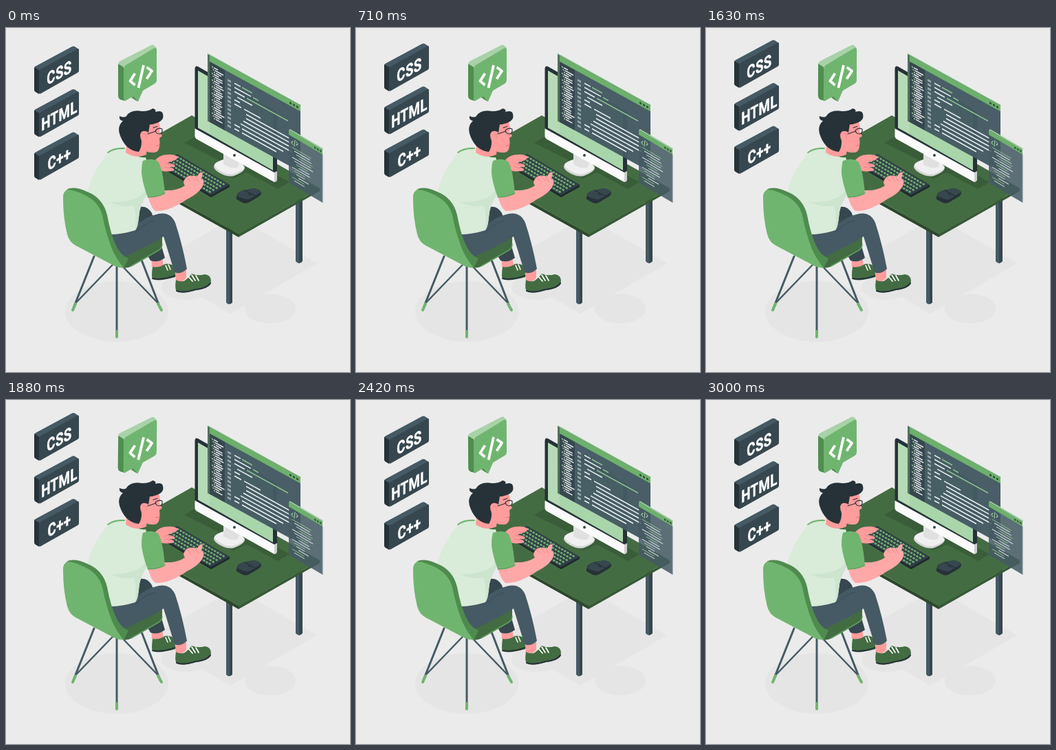
An HTML page for the animation above (3040 ms loop, 500 px wide and 500 px high).

```html
<!DOCTYPE html>
<html lang="en">
<head>
<meta charset="utf-8">
<title>Developer at a desk</title>
<style>
html, body { margin: 0; width: 100%; height: 100%; overflow: hidden; background: #ebebeb; }
svg { display: block; width: 100vw; height: 100vh; }
.line { fill: none; stroke-linecap: round; stroke-linejoin: round; }
.label { font: bold 25px Roboto, Arial, sans-serif; letter-spacing: .5px; fill: #fff; text-anchor: middle; stroke: #fff; stroke-width: .5; stroke-linejoin: round; }
</style>
</head>
<body>
<svg viewBox="0 0 500 500">
  <!-- floor -->
  <g fill="#e5e5e5">
    <ellipse cx="161" cy="412" rx="75" ry="44"/>
    <ellipse cx="384" cy="408" rx="37" ry="21.500"/>
    <path d="M208 346L326 415L452 342L334 274Z"/>
    <ellipse cx="262" cy="377" rx="36" ry="18"/>
  </g>

  <!-- desk -->
  <g fill="#455a64">
    <path d="M421 245H431V339Q426 345 421 339Z"/>
    <path d="M320 288H329V399Q324 404 320 399Z"/>
  </g>
  <path d="M426 245H431V339L426 342ZM325 288H329V399L325 401Z" fill="#37474f"/>
  <path d="M152 195L338 299V304L152 200Z" fill="#2c482c"/>
  <path d="M338 299L456 233V237L338 304Z" fill="#365a36"/>
  <path d="M270 127L456 233L338 299.500L152 194Z" fill="#446c42"/>
  <path d="M259 167L283 153L412 224L395 234L350 210L330 219L306 208L315 195Z" fill="#3a5d39"/>

  <!-- monitor -->
  <path d="M316 184L340 196L347 203Q347 209 331 215Q322 217 311 211Q299 204 303 199Q306 195 316 192Z" fill="#d6d6d6"/>
  <path d="M316 182L340 194L347 202Q346 207 331 212Q322 214 312 208Q300 201 304 197Q307 194 316 191Z" fill="#f0f0f0"/>
  <path d="M316 182L340 194L337 202Q328 206 316 198Z" fill="#e0e0e0"/>
  <path d="M274.500 60Q274.500 54 279 56L391 120Q394 122 394 126V215L274.500 149Z" fill="#263238"/>
  <path d="M279 62L388 124V207L279 145Z" fill="#a9d5aa"/>
  <path d="M279 62L296 72V154L279 145Z" fill="#b5dab5"/>
  <path d="M274.500 146L390 210V224L278 162Q274.500 160 274.500 157Z" fill="#fafafa"/>
  <path d="M390 210L394 208V221Q393 224 390 224Z" fill="#d0d0d0"/>
  <circle cx="332" cy="185" r="2" fill="#37474f"/>

  <!-- floating windows -->
  <path d="M292 38L294 37L429 112L428 113Z" fill="#a4d0a4"/>
  <g id="editor" transform="matrix(1 .55 0 1 293 38)">
    <path d="M0 0H135V97H0Z" fill="#455a64" opacity=".97"/>
    <path d="M0 9H25V97H0Z" fill="#37474f"/>
    <path d="M0 0H135V9H0Z" fill="#6db06c"/>
    <path d="M0 0H3V97H0Z" fill="#53715f"/>
    <path d="M119 3.500h3v3h-3zM124 3.500h3v3h-3zM129 3.500h3v3h-3z" fill="#35543a"/>
  </g>
  <path d="M411 148L413 147L461 175L460 177Z" fill="#a4d0a4"/>
  <g id="panel" transform="matrix(1 .585 0 1 411 148)">
    <path d="M0 0H49V77H0Z" fill="#455a64" opacity=".86"/>
    <path d="M0 0H49V7H0Z" fill="#6db06c"/>
    <path d="M48 7H49.500V77H48Z" fill="#6f828b"/>
    <path d="M37 2.500h2.500v2.500h-2.500zM41 2.500h2.500v2.500h-2.500zM45 2.500h2.500v2.500h-2.500z" fill="#35543a"/>
    <path class="line" d="M6 13l-2 3 2 2M11 11l2 2-2 3M9 10l-1 9" stroke="#a9d5aa"/>
  </g>

  <!-- keyboard and mouse -->
  <path d="M221 200L249 184L325 228V231L298 246Z" fill="#1e282d"/>
  <path d="M221 198L249 183L325 228L298 243Z" fill="#303f46"/>
  <g id="keys" class="line" stroke="#70ad70" stroke-width="2.600" stroke-dasharray="3.400 1.400" style="stroke-linecap:butt"></g>
  <path d="M335 246Q336 238 345 236L360 233Q371 235 371 240Q371 243 366 246L354 253Q350 256 344 254L337 250Q334 249 335 246Z" fill="#263238"/>
  <path d="M336 244Q338 238 346 236L360 233Q370 234 370 239Q364 243 353 249Q347 250 336 244Z" fill="#37474f"/>
  <path class="line" d="M347 236L362 244M352 241l4 2" stroke="#1e282d"/>

  <!-- far arm and far leg -->
  <path d="M216 193Q223 184 235 184Q243 183 250 187Q249 191 243 193L234 196Q246 197 246 201Q244 202 237 202Q246 204 244 207Q234 210 224 207L214 208Z" fill="#ff9c9c"/>
  <path class="line" d="M232 197l10 2M230 202l9 2" stroke="#e98686"/>
  <path d="M211 333L227 331L229 347Q219 353 212 346Z" fill="#ff9c9c"/>
  <path d="M213 347Q211 361 213 365Q221 369 246 362L247 348Q240 342 231 343Q222 349 213 347Z" fill="#436c42"/>
  <path class="line" d="M213 364Q226 367 246 360" stroke="#263238" stroke-width="2"/>
  <path class="line" d="M232 345l3 7M236 344l3 7" stroke="#fff" stroke-width="1.500"/>
  <path d="M186 263Q203 254 212 269L231 334Q221 342 210 338L188 300Z" fill="#37474f"/>

  <!-- chair legs and seat -->
  <g class="line" stroke="#455a64" stroke-width="3">
    <path d="M128 332L98 407M195 332L224 407M161 342V445"/>
    <path d="M157 342L102 399M165 342L220 399" stroke-width="2.500"/>
  </g>
  <path class="line" d="M101 401L97 410M221 401L226 410M161 441V449" stroke="#70b56f" stroke-width="4"/>
  <path d="M155 325L227 302V317Q227 321 222 324L183 346Q174 351 165 347Z" fill="#436c42"/>
  <path class="line" d="M227 314Q227 320 222 323L182 346" stroke="#5c9d5b" stroke-width="1.500"/>

  <!-- near leg -->
  <path d="M245 350L262 347L262 363Q255 372 247 367Z" fill="#ff9c9c"/>
  <path d="M247 366Q245 379 248 382Q256 387 276 381Q297 378 298 368Q298 359 289 358Q278 361 270 357Q263 366 258 368Q251 369 247 366Z" fill="#436c42"/>
  <path class="line" d="M248 382Q257 386 276 380Q293 378 297 371" stroke="#263238" stroke-width="2.200"/>
  <path class="line" d="M265 361l6 7M270 359l5 8M276 360l4 7" stroke="#fff" stroke-width="1.700"/>
  <path d="M150 299L188 288Q203 274 222 270Q239 267 246 283Q256 313 263 350Q254 359 245 355L229 303Q212 314 196 321L168 335Z" fill="#455a64"/>
  <path class="line" d="M188 297Q207 280 216 280" stroke="#3a4d56"/>

  <!-- torso and neck -->
  <path d="M152 177Q163 171 177 178Q194 190 203 188Q212 215 204 242Q194 258 193 276Q191 291 188 294Q169 300 151 300L118 239Q126 207 152 177Z" fill="#d9ebd9"/>
  <path d="M205 230Q201 242 190 247Q165 256 150 252Q168 262 186 258Q190 271 188 293Q192 290 193 275Q194 258 205 242Z" fill="#cde4ce"/>
  <path class="line" d="M148 181Q158 174 172 175" stroke="#70b56f" stroke-width="2"/>
  <path d="M175 169L205 174L204 184Q189 191 174 181Z" fill="#ff9c9c"/>

  <!-- head -->
  <path d="M198 140L222 136Q225 145 223 150L227 157L223 160Q224 165 223 172Q222 182 213 181Q204 181 196 175L190 160Z" fill="#ff9c9c"/>
  <path d="M165 128Q172 131 175 128Q181 118 198 121Q208 121 213 117Q219 118 217 122Q227 119 228 125Q231 135 216 139Q211 141 209 140L207 152Q197 148 196 158Q199 171 193 180Q175 178 167 159Q160 144 170 135Q164 134 165 128Z" fill="#263238"/>
  <path d="M206 151Q197 147 195 155Q195 167 205 166Z" fill="#ff9c9c"/>
  <path class="line" d="M199 154Q205 153 204 160" stroke="#e98686"/>
  <path class="line" d="M206 154L218 150M217 149Q222 144 227 147Q228 153 223 154Q218 154 217 149M214 145l6-2" stroke="#263238" stroke-width="1.100"/>
  <path class="line" d="M218 171l5-1" stroke="#d87878"/>

  <!-- near arm -->
  <path d="M206 242L230 236Q249 237 260 229Q255 223 263 216Q270 213 278 216Q281 208 286 210Q285 215 284 220Q289 219 287 227Q283 239 263 249Q237 267 217 266Q209 259 206 242Z" fill="#ffa8a8"/>
  <path class="line" d="M262 217l6 5M269 215l6 7M276 217l4 6" stroke="#e98686"/>
  <path d="M199 193Q212 188 221 194Q228 204 231 241Q221 247 206 246Q199 228 197 211Q197 199 199 193Z" fill="#70b56f"/>
  <path class="line" d="M206 246Q220 246 231 240" stroke="#569b55"/>

  <!-- chair back -->
  <path d="M83 248Q82 237 91 234Q98 231 117 238Q139 247 144 270Q149 302 157 322Q162 334 174 337Q168 343 172 349Q165 349 158 346L101 316Q92 311 89 300Q83 276 83 248Z" fill="#70b56f"/>
  <path d="M88 235Q98 229 118 238Q141 247 147 272Q152 299 160 316Q166 330 178 335L171 349Q160 335 154 321Q145 298 140 272Q135 253 115 243Q97 234 88 235Z" fill="#4f8b4e"/>

  <g id="tags"></g>

  <!-- speech bubble -->
  <g id="bubble">
    <path d="M163 52L171 55L173 106L166 104Q163 102 163 99Z" fill="#4f8e4e"/>
    <path d="M163 52Q163 50 166 48L211 25Q213 24 215 25L219 29L171 57Z" fill="#a8d2a8"/>
    <path d="M171 59Q171 56 174 54L214 30Q219 27 219 32V76Q219 79 216 81L199 91L192 107L185 99L175 105Q171 108 171 103Z" fill="#70b56f"/>
    <path d="M185 99L192 107L188 105L182 101Z" fill="#4f8e4e"/>
    <path class="line" d="M187.500 66L180.500 77L187.500 83M200 54L192.500 87M204.500 57L212 62.500L204.500 74" stroke="#fff" stroke-width="3.800" style="stroke-linecap:butt"/>
  </g>
</svg>
<script>
const LOOP = 3040;
const $ = id => document.getElementById(id);
const add = (id, markup) => $(id).insertAdjacentHTML('beforeend', markup);
const bar = (x, y, w, h, color) => `<rect x="${x}" y="${y}" width="${w}" height="${h}" fill="${color}"/>`;

let seed = 7;
const random = () => (seed = seed * 16807 % 2147483647) / 2147483647;

// Editor: file list, line numbers, code
for (let i = 0; i < 24; i++) {
  const x = 6 + i % 3 * 1.5, y = 14 + i * 3.2;
  add('editor', bar(x, y, 2, 1.6, '#a9d5aa') + bar(x + 3, y, 6 + random() * 7, 1.6, '#f2f6f6'));
}
const code = [[39, 9, 50, 15], [39, 24, 66, 8], [39, 15, 57, 60], [43, 22], [39, 8],
  [39, 10, 53, 24], [56, 63], [56, 67], [52, 70], [48, 74], [39, 8, 50, 60], [39, 7, 50, 50]];
code.forEach((row, i) => {
  const y = 20 + i * 6;
  add('editor', bar(29, y, 5, 3, '#9aaab0'));
  for (let k = 0; k < row.length; k += 2)
    add('editor', bar(row[k], y, row[k + 1], 1.7, i < 4 && k ? '#8fc48f' : '#f2f6f6'));
});
for (let i = 0; i < 14; i++) {
  const x = 5 + i % 4 * 3, y = 22 + i * 3.6;
  add('panel', bar(x, y, 9 + random() * 20, 1.1, i % 3 ? '#d5dfe0' : '#8fc48f'));
}

// Keyboard rows
for (let i = 0; i < 5; i++) {
  const x = 248.5 - i * 5, y = 187 + i * 2.8;
  add('keys', `<path d="M${x} ${y}l70 41.300"/>`);
}

['CSS', 'HTML', 'C++'].forEach((name, i) => add('tags', `
  <g transform="translate(0 ${i * 62.5})">
    <path d="M41 59Q41 56 44 55L96 27Q98 26 100 27L106 31L49 63Z" fill="#455a64"/>
    <path d="M41 57L48 61V96L43 93Q41 92 41 90Z" fill="#263238"/>
    <path d="M48 63Q48 61 50 60L103 31Q106 29 106 32V62Q106 64 104 65L51 95Q48 97 48 94Z" fill="#37474f"/>
    <text class="label" transform="matrix(.75 -.4 0 1 77.500 73.500)">${name}</text>
  </g>`));

function draw() {
  const turn = performance.now() % LOOP / LOOP * 2 * Math.PI;
  $('tags').setAttribute('transform', `translate(0 ${4.5 * (Math.cos(turn) - 1)})`);
  $('bubble').setAttribute('transform', `rotate(${.6 * Math.sin(2 * turn)} 191 66)`);
  requestAnimationFrame(draw);
}
draw();
</script>
</body>
</html>
```
